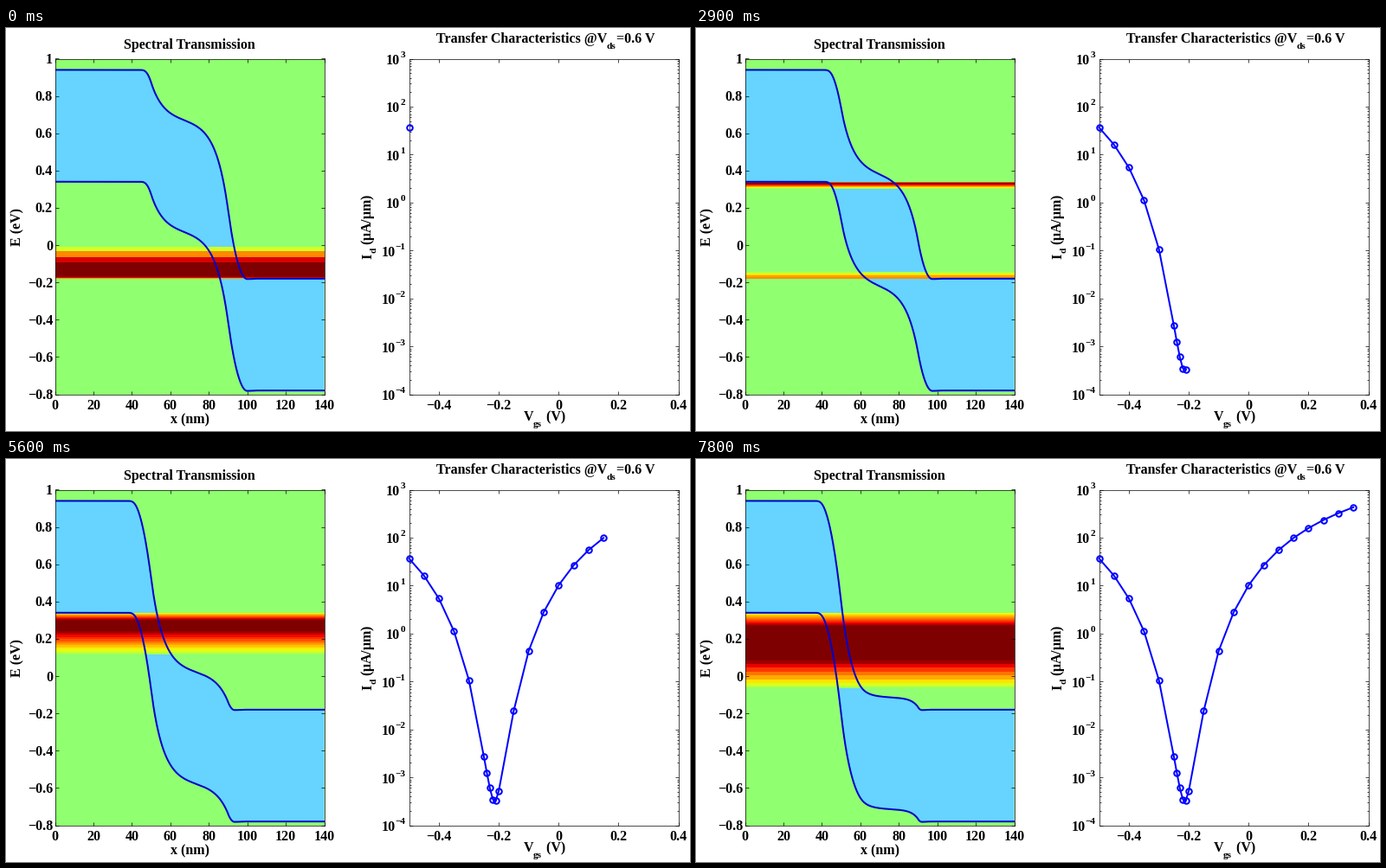
A matplotlib script that plays this animation: 790x466 px, repeating every 8000 ms.

```python
import numpy as np
import matplotlib.pyplot as plt
from matplotlib.animation import FuncAnimation
from matplotlib.patches import Polygon

W, H, DPI = 790, 466, 100
PX = 72 / DPI
SERIF = "Liberation Serif"
plt.rcParams.update({
    "font.family": SERIF, "font.weight": "bold", "font.size": 16 * PX,
    "mathtext.fontset": "custom", "mathtext.rm": SERIF, "axes.linewidth": 0.5,
})

# Gate sweep (V), finer around the current minimum
VGS = np.concatenate([np.arange(-50, -25, 5), np.arange(-25, -20),
                      np.arange(-20, 41, 5)]) / 100
V_MIN = -0.21

# Start of each sweep step, in tenths of a second; the sweep turns back at the end
STARTS = [*range(0, 15, 2), *range(19, 40, 10), *range(44, 67, 2)]
TURN = 78

# Device: source up to 50 nm, channel, drain from 90 nm
X = np.linspace(0, 140, 561)
E_SRC, E_DRN, GAP = 0.94, -0.18, 0.6
SCREEN, CURVE = 6.4, 0.0038

STEEPEST = 34.5  # decades per volt
ROWS = 388
ROW_Y = np.arange(ROWS) + 0.5


def row_of(energy):
    return (1 - energy) / 1.8 * ROWS


def tunnel(drive, top, barrier):
    """Tunnelling law in log10, continued as a line once it gets too steep."""
    knee = np.sqrt(barrier / STEEPEST)
    return (top - barrier / np.maximum(drive, knee)
            - STEEPEST * np.maximum(knee - drive, 0))


def carriers(vgs):
    """Hole and electron currents in uA/um."""
    return (10 ** tunnel(-0.1042 - vgs, 4.048, 0.9824),
            10 ** tunnel(0.3315 + vgs, 4.173, 1.0496))


def softplus(v, scale):
    return scale * np.logaddexp(0, v / scale)


def saturate(e):
    """Channel charge slows the band once it nears the drain level."""
    return e + 0.75 * softplus(-0.097 - e, 0.03)


def junction(step, length):
    """Drop inside the doped region and its depletion width."""
    k = length * np.sqrt(CURVE)
    root = np.sqrt(k * k + step) - k
    return root ** 2, root / np.sqrt(CURVE)


def band_edge(vgs):
    free = 0.17 - vgs
    level = saturate(free)
    charge = 1 / (1 + np.exp((free + 0.097) / 0.03))
    length = SCREEN * np.sqrt(1 - 0.75 * charge)
    d_src, w_src = junction(E_SRC - free, SCREEN)
    d_drn, w_drn = junction(level - E_DRN, length)

    source = E_SRC - CURVE * softplus(X - 50 + w_src, 1.0) ** 2
    rise = (E_SRC - free - d_src) * np.exp(-np.maximum(X - 50, 0) / SCREEN)
    fall = (level - E_DRN - d_drn) * np.exp(-np.maximum(90 - X, 0) / length)
    channel = saturate(free + rise) - fall
    end = 90 + w_drn
    drain = E_DRN + CURVE * np.maximum(end - X, 0) ** 2
    drain -= 0.002 * np.exp(-((X - end - 0.5) / 2.5) ** 2)
    return np.where(X < 50, source, np.where(X <= 90, channel, drain))


def paint(rgba, depth, drive, amp, sharp, gain, steps):
    """Colour one current window; depth counts rows from its sharp edge."""
    u = max(drive, 0)
    width = 8 + 55 * u + 155 * u * u
    ramp = sharp * width
    flat = (0.3 + gain * u * u) * width
    step = max(1, width / steps)
    block = flat + (np.floor((depth - flat) / step) + 0.5) * step
    up = 0.62 + 0.38 * depth / ramp
    down = 1 - 0.45 * (block - flat) / (width - flat)
    level = np.clip(np.where(depth < ramp, up, down), 0.55, 1)
    inside = (depth >= 0) & (depth < width) & (amp > 0.05)
    rgba[inside] = plt.cm.jet(0.55 + (level - 0.55) * amp)[inside]


def spectrum(vgs):
    rgba = np.zeros((ROWS, 4))
    currents = np.array(carriers(vgs))
    amp_h, amp_e = (currents / currents.max()) ** 1.2
    paint(rgba, row_of(-0.184) - ROW_Y, V_MIN - vgs, amp_h,
          sharp=0.06, gain=2.7, steps=6)
    paint(rgba, ROW_Y - row_of(0.338), vgs - V_MIN, amp_e,
          sharp=0.18, gain=1.05, steps=20)
    return rgba[:, None, :]


fig = plt.figure(figsize=(W / DPI, H / DPI), dpi=DPI, facecolor="white")


def put(x, y, text, ha="center", size=16, **kw):
    fig.text(x / W, 1 - y / H, text, ha=ha, va="baseline", size=size * PX,
             rotation_mode="anchor", **kw)


def put_script(x, y, head, script, tail="", shift=7, rotation=0):
    """Head ends at (x, y); the small script and the tail follow it."""
    gap = 5.5 * len(script)
    up = rotation == 90
    put(x, y, head, "right", rotation=rotation)
    put(x + shift * up, y + shift * (not up), script, "left", 11.2,
        rotation=rotation)
    put(x + gap * (not up), y - gap * up, tail, "left", rotation=rotation)


def number(value):
    return f"{value:g}".replace("-", "\u2212")


def make_axes(left, xlim, ylim, xticks, yticks):
    ax = fig.add_axes([left / W, 1 - 423.5 / H, 311 / W, ROWS / H])
    ax.set(xlim=xlim, ylim=ylim, xticks=xticks, yticks=yticks)
    ax.tick_params(direction="in", top=True, right=True, length=4 * PX,
                   width=0.5, labelbottom=False, labelleft=False)
    for t in xticks:
        put(left + 311 * (t - xlim[0]) / (xlim[1] - xlim[0]), 441, number(t))
    return ax


# Band diagram
e_ticks = np.arange(-4, 6) / 5
bands = make_axes(56.5, (0, 140), (-0.8, 1), range(0, 141, 20), e_ticks)
bands.set_facecolor("#90ff70")
for e in e_ticks:
    put(54, 35.5 + row_of(e) + 5.5, number(e), "right")
put(212, 24, "Spectral Transmission")
put(212, 457, "x (nm)")
put(17, 229.5, "E (eV)", rotation=90)

gap_fill = bands.add_patch(Polygon(np.zeros((3, 2)), fc="#66d4ff", ec="none",
                                   zorder=0.2))
window = bands.imshow(np.zeros((ROWS, 1, 4)), extent=(0, 140, -0.8, 1),
                      aspect="auto", interpolation="nearest", zorder=0.3)
edges = [bands.plot([], [], color="#0000cd", lw=2 * PX)[0] for _ in range(2)]

# Transfer curve on a logarithmic scale
decades = range(-4, 4)
transfer = make_axes(465.5, (-0.5, 0.4), (-4, 3), np.arange(-2, 3) / 5, decades)
transfer.set_yticks([d + np.log10(m) for d in range(-4, 3)
                     for m in range(2, 10)], minor=True)
transfer.tick_params(which="minor", direction="in", right=True,
                     length=2 * PX, width=0.5)
for d in decades:
    power = number(d)
    put_script(461 - 5.7 * len(power), 35.5 + (3 - d) * ROWS / 7 + 6.5,
               "10", power, shift=-8)
put_script(694, 17, "Transfer Characteristics @V", "ds", "=0.6 V")
put_script(609, 454, "V", "gs", " (V)")
put_script(422, 260.5, "I", "d", r" ($\mathrm{μ}$A/$\mathrm{μ}$m)",
           shift=6, rotation=90)
curve, = transfer.plot([], [], "-o", color="#0000ff", lw=2 * PX, ms=6.5 * PX,
                       mfc="none", mew=2 * PX, clip_on=False, zorder=3)


def update(frame):
    i = np.searchsorted(STARTS, frame, side="right") - 1 - (frame >= TURN)
    upper = band_edge(VGS[i])
    lower = upper - GAP
    gap_fill.set_xy(np.column_stack([np.r_[X, X[::-1]],
                                     np.r_[upper, lower[::-1]]]))
    for line, e in zip(edges, (upper, lower)):
        line.set_data(X, e)
    window.set_data(spectrum(VGS[i]))
    swept = VGS[:i + 1]
    curve.set_data(swept, np.log10(sum(carriers(swept))))
    return [gap_fill, window, curve, *edges]


anim = FuncAnimation(fig, update, frames=80, interval=100, repeat=True,
                     repeat_delay=0, blit=False)
plt.show()
```
